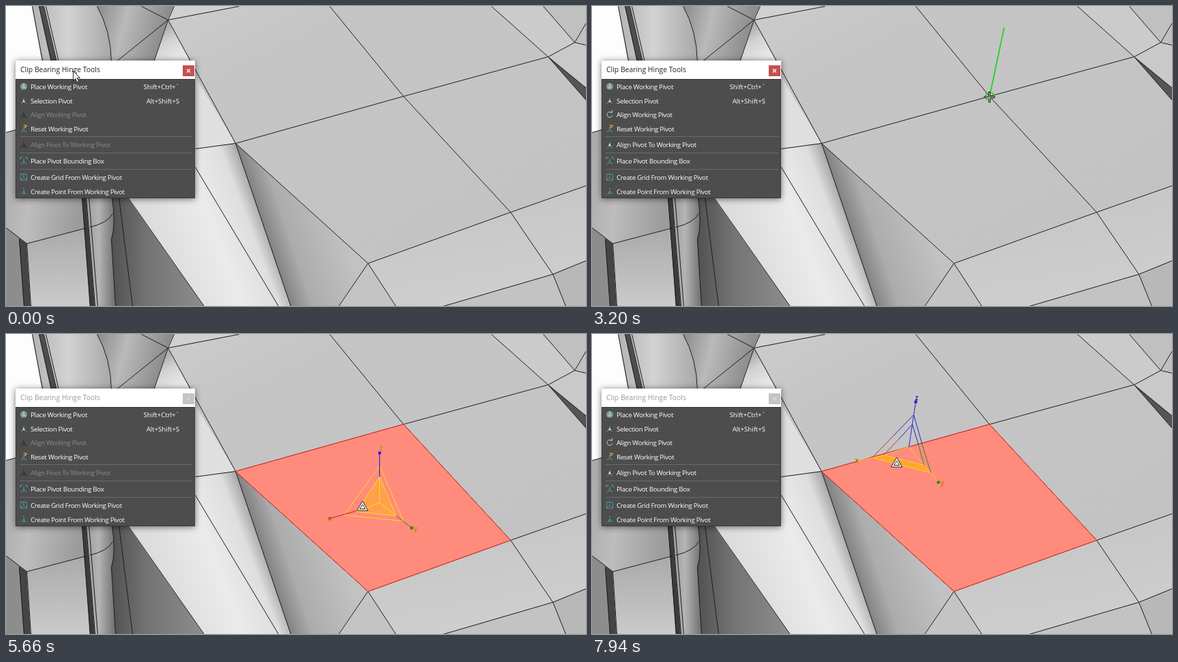
An HTML page for the animation above (8 s loop, 850 px wide and 440 px high).

```html
<!DOCTYPE html>
<html lang="en">
<head>
<meta charset="utf-8">
<title>Placing a working pivot</title>
<style>
html, body { margin: 0; width: 100%; height: 100%; overflow: hidden; background: #c4c4c4; }
svg { display: block; width: 850px; height: 440px; }
text { font: 9.8px "Open Sans", "Noto Sans", sans-serif; letter-spacing: -.34px; }
.wire { fill: none; stroke: #1c1c1c; stroke-width: 1; }
.green { fill: none; stroke: #14d81c; stroke-width: 1.7; }
.thin { fill: none; stroke-width: 1; }
.tag { font-size: 10px; font-weight: 600; letter-spacing: 0; }
.frame { filter: drop-shadow(0 1px 5px rgba(0,0,0,.55)); }
.title { font-size: 10.4px; letter-spacing: 0; }
.keys { letter-spacing: -.1px; }
.icon { fill: none; stroke: #4fb4c2; stroke-width: .9; }
.off { stroke: #333; }
[data-on] { display: none; }
</style>
</head>
<body>
<svg viewBox="0 0 850 440">
<defs>
  <linearGradient id="top" x1="0" y1="0" x2="1" y2="1"><stop offset="0" stop-color="#d2d2d2"/><stop offset=".3" stop-color="#c5c5c5"/><stop offset="1" stop-color="#c2c2c2"/></linearGradient>
  <linearGradient id="drum" x1="0" y1="0" x2="1" y2=".2"><stop offset="0" stop-color="#aaa"/><stop offset=".4" stop-color="#bdbdbd"/><stop offset="1" stop-color="#9b9b9b"/></linearGradient>
  <linearGradient id="drumLow" x1="0" y1="0" x2="0" y2="1"><stop offset="0" stop-color="#a9a9a9"/><stop offset="1" stop-color="#cbcbcb"/></linearGradient>
  <linearGradient id="post" x1="0" y1="0" x2="1" y2="0"><stop offset="0" stop-color="#949494"/><stop offset=".5" stop-color="#b4b4b4"/><stop offset="1" stop-color="#707070"/></linearGradient>
  <linearGradient id="gap" x1="0" y1="0" x2="1" y2="0"><stop offset="0" stop-color="#515151"/><stop offset=".4" stop-color="#747474"/><stop offset="1" stop-color="#8d8d8d"/></linearGradient>
  <linearGradient id="slope" gradientUnits="userSpaceOnUse" x1="225" y1="360" x2="385" y2="300"><stop offset="0" stop-color="#dcdcdc"/><stop offset=".5" stop-color="#ebebeb"/><stop offset=".8" stop-color="#dedede"/><stop offset="1" stop-color="#8c8c8c"/></linearGradient>
  <linearGradient id="side" gradientUnits="userSpaceOnUse" x1="375" y1="320" x2="480" y2="285"><stop offset="0" stop-color="#808080"/><stop offset=".3" stop-color="#acacac"/><stop offset="1" stop-color="#c2c2c2"/></linearGradient>
  <linearGradient id="lip" x1="0" y1="0" x2=".3" y2="1"><stop offset="0" stop-color="#c4c4c4"/><stop offset="1" stop-color="#cecece"/></linearGradient>
  <linearGradient id="back" x1="0" y1="0" x2="1" y2="0"><stop offset="0" stop-color="#b2b2b2"/><stop offset=".45" stop-color="#d3d3d3"/><stop offset="1" stop-color="#a8a8a8"/></linearGradient>
  <linearGradient id="bend" x1="0" y1="0" x2="1" y2=".2"><stop offset="0" stop-color="#8a8a8a"/><stop offset=".4" stop-color="#bababa"/><stop offset="1" stop-color="#858585"/></linearGradient>
  <linearGradient id="fold" x1="0" y1="0" x2=".5" y2="1"><stop offset="0" stop-color="#8a8a8a"/><stop offset=".5" stop-color="#d4d4d4"/><stop offset="1" stop-color="#f0f0f0"/></linearGradient>
  <g id="tripod" class="icon"><path d="M0-4V1L-4 4M0 1L4 4"/></g>
</defs>

<!-- model faces -->
<path fill="url(#top)" d="M0 0H850V440H0Z"/>
<path fill="#fdfdfd" d="M0 0H38L55 90V175L0 186Z"/>
<path fill="url(#back)" d="M38 0H133Q153 30 154 90H54Z"/>
<path fill="#4d4d4d" d="M48 0H55L74 82H66Z"/>
<path fill="url(#bend)" d="M133 0H246L237 20L214 90H154Q154 35 133 0Z"/>
<path fill="url(#fold)" d="M237 20L214 90H277V95Z"/>
<path fill="#d0d0d0" d="M246 0H341L237 20Z"/>
<path fill="#dfdfdf" d="M260 75L336 201L277 209Z"/>
<path fill="url(#drum)" d="M0 185L120 160V325L30 348L0 325Z"/>
<path fill="#8d8d8d" d="M0 325L30 348L36 440H0Z"/>
<path fill="#454545" d="M19 341L30 348L36 440H26Z"/>
<path fill="url(#drumLow)" d="M30 348L118 325L126 440H36Z"/>
<path fill="url(#post)" d="M112 278H156Q161 320 154 342L160 440H122Z"/>
<path fill="#3c3c3c" d="M111 280H117L130 440H123Z"/>
<path fill="url(#gap)" d="M155 278H178L290 440H160L154 342Q161 320 155 278Z"/>
<path fill="url(#slope)" d="M176 278L277 209L336 201L417 440H290Z"/>
<path fill="url(#side)" d="M336 201L530 377L487 440H417Z"/>
<path fill="#c4c4c4" d="M530 377L487 440H571Z"/>
<path fill="url(#lip)" d="M530 377L739 302L850 263V373L801 393L640 440H571Z"/>
<path fill="#c3c3c3" d="M640 440L801 393L820 440Z"/>
<path fill="#b8b8b8" d="M801 393L850 373V440H820Z"/>
<path fill="#cbcbcb" d="M711 0H787L833 53L794 74Z"/>
<path fill="#c0c0c0" d="M787 0H850V57L833 53Z"/>
<path fill="#c9c9c9" d="M794 74L833 53L850 57V120Z"/>
<path fill="#555" d="M794 74L850 120V138Z"/>

<!-- model edges -->
<g class="wire" transform="translate(.5 .5)">
  <path d="M38 0L54 85M48 0L66 82M55 0L74 82M58 0L77 82M133 0Q153 35 154 82M198 0L237 20L160 82M237 20L216 82M246 0L237 20L341 0"/>
  <path d="M237 20L336 201L582 132L794 74L833 53L850 57M474 0L582 132L739 302L801 393L820 440M711 0L794 74L850 138M794 74L850 120M787 0L833 53L850 24"/>
  <path d="M336 201L530 377L739 302L850 263M336 201L417 440M530 377L487 440M530 377L571 440M640 440L801 393L850 373M277 209L336 201M277 236L399 440M178 280L290 440"/>
  <path d="M0 185L14 181M0 325L30 348L118 325M30 348L36 440M19 341L26 440M111 280L123 440M117 280L130 440M121 280L134 440M122 324Q148 318 156 304M155 280Q161 320 154 342L160 440M165 280L185 440"/>
</g>

<!-- selection and snapping -->
<path data-on="5000-8000" fill="#ff8b7d" stroke="#e32a1c" transform="translate(.5 .5)" d="M336 201L582 132L739 302L530 377Z"/>
<g class="green" transform="translate(.5 .5)">
  <path data-on="1750-2180" d="M237 20L336 201L582 132L474 0"/>
  <path data-on="2180-2750" d="M336 201L582 132"/>
  <path data-on="2180-2750" stroke-width="1.2" d="M458 160h10v10h-10Z"/>
  <path data-on="2750-3500" stroke-width="1.2" d="M577 127h10v10h-10Z"/>
  <path data-on="3500-4900 6600-7700" d="M336 201L582 132L739 302L530 377Z"/>
  <path data-on="3500-4900 6600-7700" stroke-width="1.2" d="M541 242h10v10h-10Z"/>
  <path data-on="6680-7100" d="M23 10L34 82"/>
  <path data-on="6680-7100" stroke="#1b2bd0" d="M0 117L15 114"/>
  <path id="ray" data-on="2100-4700 6600-7700"/>
  <path id="head" data-on="3500-4700" stroke-width="1.2" d="M-4-7H4L0 1Z"/>
</g>
<g data-on="6800-7700" class="thin">
  <path stroke="#555" d="M464 165L475 95"/><path stroke="#9b2a20" d="M464 165L388 184M464 165L511 217"/>
  <text class="tag" x="473" y="96" fill="#222">z</text>
  <text class="tag" x="385" y="188" fill="#8c1d14">x</text>
  <text class="tag" x="509" y="220" fill="#8c1d14">y</text>
</g>

<!-- manipulators -->
<g data-on="5400-6400" class="thin" transform="translate(.5 .5)">
  <path fill="#ffa04d" d="M547 209L513 260L571 266Z"/>
  <path stroke="#ffdc1e" d="M547 193L495 265L582 274ZM547 209L513 260L571 266ZM547 247V209M547 247L513 260M547 247L571 266"/>
  <path stroke="#1a18d8" d="M547 174V209"/>
  <path stroke="#c22018" d="M474 270L513 259"/><path stroke="#527018" d="M571 266L594 284"/>
  <path fill="#1a18d8" d="M545 172h4v4h-4Z"/><path fill="#b8231a" d="M472 268h4v4h-4Z"/><path fill="#13851e" d="M592 282h4v4h-4Z"/>
  <g fill="#c78a00"><text class="tag" x="547" y="170">z</text><text class="tag" x="471" y="273">x</text><text class="tag" x="597" y="288">y</text></g>
</g>
<g data-on="7700-8000" class="thin" transform="translate(.5 .5)">
  <path fill="#ffa62e" stroke="#ffd51f" d="M410 181L427 177L486 192L496 203Z"/>
  <path stroke="#ffd51f" d="M388 186L410 181M427 177L464 165L486 192M496 203L507 217"/>
  <path stroke="#d92b25" d="M410 181L441 149M427 177L448 155"/>
  <path stroke="#23902a" d="M496 203L483 160M486 192L478 162"/>
  <path stroke="#2824c8" d="M474 99L471 118L464 165M441 149L471 118L483 160M448 155L469 132L478 162"/>
  <path fill="#1a18c0" d="M472 97h4v4h-4Z"/><path fill="#13851e" d="M505 215h4v4h-4Z"/><path fill="#e8bd16" d="M387 184h4v4h-4Z"/>
  <text class="tag" x="473" y="96" fill="#17158c">z</text><text class="tag" x="385" y="188" fill="#9a6a00">x</text><text class="tag" x="510" y="221" fill="#b98500">y</text>
</g>

<!-- tool window -->
<path class="frame" fill="#4d4d4d" d="M14 80H277V282H14Z"/>
<path fill="#fff" d="M14 80H277V107H14Z"/>
<path fill="none" stroke="#3a3a3a" d="M14.500 107.500H276.500V281.500H14.500Z"/>
<text id="title" class="title" x="21" y="97">Clip Bearing Hinge Tools</text>
<path id="close" d="M259 87h17v16h-17Z"/>
<path id="closeX" stroke="#fff" stroke-width="1.400" d="M265 92.500l5 5m0-5l-5 5"/>
<path data-on="700-1460 6160-6400" fill="#5588c7" d="M15 108H276V128H15Z"/>
<path stroke="#6b6b6b" d="M20 191.500H273M20 215.500H273M20 239.500H273"/>
<g id="menu"></g>
<g>
  <circle cx="26" cy="118" r="5" fill="#84999c"/><path class="icon" d="M26 114v4l-3 3m3-3l3 3" style="stroke:#d5f2f4"/>
  <use href="#tripod" x="26" y="139"/><path fill="#ddd" d="M24 141l2-4l2 4Z"/>
  <path class="icon" data-on="1460-5420 6400-8000" style="stroke:#ccd8d8" d="M29 156.500A4 4 0 1 0 30 160M26 156h3.500v-3.500"/>
  <path class="icon off" data-on="0-1460 5420-6400" d="M26 154v6l-5 4m5-4l5 4M23 163l3-6l3 6Z"/>
  <use href="#tripod" x="26" y="181"/><path fill="none" stroke="#f0a32c" stroke-width="1.300" d="M27 179l4-4M26 175h3"/>
  <g data-on="1460-5420 6400-8000"><use href="#tripod" x="26" y="204"/><path fill="#ddd" d="M24 205l2-4l2 4Z"/></g>
  <path class="icon off" data-on="0-1460 5420-6400" d="M26 198v6l-5 4m5-4l5 4M23 207l3-6l3 6Z"/>
  <use href="#tripod" x="26" y="228"/><path class="icon" d="M21 225v-3h3M28 222h3v3"/>
  <path class="icon" stroke-opacity=".8" d="M21.500 246.500h9v9h-9ZM26 247v4l-4 4M26 251l4 4"/>
  <path class="icon" d="M26 267v2M22 276h-1M31 276h-1M24 275l2-4l2 4Z"/>
</g>

<!-- pointers -->
<g id="pointer">
  <path data-on="0-1560 5900-6400" fill="#fff" stroke="#111" stroke-width=".9" d="M0 0V14L3.300 11L5.600 16.300L8 15.200L5.700 10H10Z"/>
  <g data-on="1560-5360 6400-7700" fill="none"><path stroke="#111" stroke-width="3" d="M-8 0h6M2 0h6M0-8v6M0 2v6"/><path stroke="#eee" d="M-7 0h5M2 0h5M0-7v5M0 2v5"/></g>
  <g data-on="5360-5900 7700-8000" fill="#fff" stroke="#222"><path d="M0-7.500L8 6.500H-8Z"/><path d="M0-2.500L4 4H-4Z"/></g>
</g>
</svg>
<script>
const $ = id => document.getElementById(id);
const items = [
  [122, "Place Working Pivot", "Shift+Ctrl+`"],
  [142.5, "Selection Pivot", "Alt+Shift+S"],
  [163, "Align Working Pivot"],
  [183.5, "Reset Working Pivot"],
  [207, "Align Pivot To Working Pivot"],
  [231, "Place Pivot Bounding Box"],
  [255, "Create Grid From Working Pivot"],
  [275.5, "Create Point From Working Pivot"]
];
$("menu").innerHTML = items.map(([y, label, keys = ""]) =>
  `<text class="label" x="36" y="${y}" fill="#fff">${label}</text>` +
  `<text class="keys" x="254" y="${y}" fill="#fff" text-anchor="end">${keys}</text>`).join("");
const labels = document.querySelectorAll(".label");
const aligns = [labels[2], labels[4]];

// pointer path: time, x, y
const path = [
  [0, 98, 95], [500, 98, 95], [1100, 99, 124], [1460, 99, 124],
  [2180, 489, 165], [2300, 489, 165], [2900, 579, 138], [3020, 582, 133],
  [3200, 582, 133], [3860, 640, 212], [3980, 600, 230], [4040, 567, 239],
  [4300, 547, 247], [5360, 547, 247], [5620, 522, 252], [5840, 522, 252],
  [6240, 99, 122], [6380, 99, 122], [6780, 471, 170],
  [7640, 471, 170], [7900, 446, 188], [8000, 446, 188]
];
function place(t) {
  const i = Math.max(1, path.findIndex(p => p[0] >= t));
  const [a, ax, ay] = path[i - 1], [b, bx, by] = path[i];
  const k = (t - a) / (b - a);
  return [ax + (bx - ax) * k, ay + (by - ay) * k];
}

const parse = s => s.split(" ").map(r => r.split("-").map(Number));
const within = (spans, t) => spans.some(([a, b]) => t >= a && t < b);
const timed = [...document.querySelectorAll("[data-on]")].map(el => [el, parse(el.dataset.on)]);
const enabled = parse("1460-5420 6400-8000");
const blurred = parse("4640-6160 7100-8000");

function draw() {
  const t = performance.now() % 8000;
  for (const [el, spans] of timed) el.style.display = within(spans, t) ? "inline" : "none";

  const step = Math.floor(t / 20) * 20;
  const [x, y] = place(step);
  $("pointer").setAttribute("transform", `translate(${x + .5} ${y + .5})`);

  // the normal ray trails the pointer slightly
  const [rx, ry] = place(Math.max(0, step - 60));
  $("ray").setAttribute("d", `M${rx} ${ry}L${rx + 16.5 + (rx - 471) * .045} ${ry - 102}`);
  $("head").setAttribute("transform", `translate(${rx} ${ry})`);

  for (const el of aligns) el.setAttribute("fill", within(enabled, t) ? "#fff" : "#8b8b8b");
  const dim = within(blurred, t);
  $("title").setAttribute("fill", dim ? "#999" : "#222");
  $("close").setAttribute("fill", dim ? "#c4c4c4" : "#c75050");
  $("closeX").setAttribute("stroke", dim ? "#d6d6d6" : "#fff");
  requestAnimationFrame(draw);
}
draw();
</script>
</body>
</html>
```
